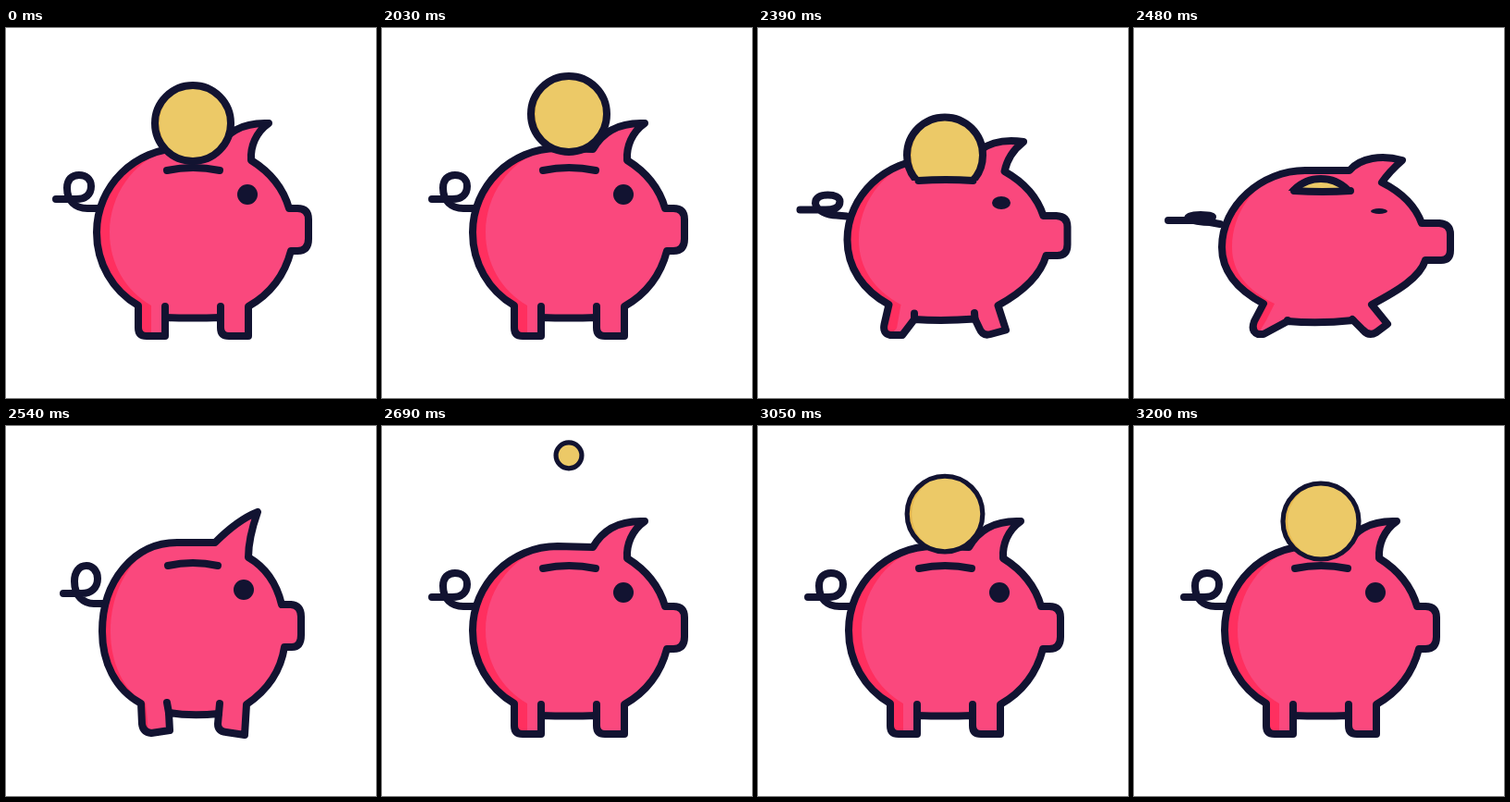
Recreate the animation shown at these times as an HTML page. Size 400x400 px, loop 3290 ms.

```html
<!DOCTYPE html>
<html lang="en">
<head>
<meta charset="utf-8">
<title>Piggy bank</title>
<style>
  html, body { margin: 0; width: 100%; height: 100%; overflow: hidden; background: #fff; }
  svg { display: block; width: 100vw; height: 100vh; }
  .line { fill: none; stroke: #121331; stroke-width: 8; stroke-linecap: round; stroke-linejoin: round; }
</style>
</head>
<body>
<svg viewBox="0 0 400 400">
  <defs>
    <clipPath id="above"><rect id="mask" width="400" height="400"/></clipPath>
    <clipPath id="disc"><circle r="41"/></clipPath>
  </defs>
  <path id="tail" class="line"/>
  <path id="fill" fill="#fa487d"/>
  <path id="shade" fill="#ff2f5f"/>
  <path id="body" class="line"/>
  <path id="stubs" class="line"/>
  <ellipse id="eye" fill="#121331"/>
  <g clip-path="url(#above)">
    <g id="coin">
      <g clip-path="url(#disc)">
        <circle r="41" fill="#e6b84f"/>
        <circle cx="5" r="41" fill="#ecc967"/>
      </g>
      <circle id="rim" class="line" r="41"/>
    </g>
  </g>
  <path id="slot" class="line"/>
</svg>
<script>
const LOOP = 3290, TICK = 30, START = 2000, END = 3200;
const $ = id => document.getElementById(id);

// Each part: rest, squashed and stretched pose with the same path structure.
const parts = {
  body: [
    'M190 130L228 131C241 108 262 102 284 103C270 113 264 128 265 143C286 156 300 174 306 195L315 195Q327 195 327 207L327 228Q327 241 315 241L308 241C301 268 285 288 262 301L262 333L241 333Q232 333 232 324L232 313Q202 314 172 313L172 333L152 333Q143 333 143 324L143 300C115 284 98 254 98 221C98 171 139 130 190 130Z',
    'M185 154L233 154C245 140 268 137 290 143C282 150 274 158 268 167C288 177 304 192 311 211L330 211Q342 212 342 223L342 240Q342 251 332 251L315 251C309 270 285 284 257 299L274 320L262 329Q254 334 247 326L237 316Q200 320 166 317L140 331L134 331Q126 328 130 317L140 298C112 283 95 264 95 237C95 192 138 154 185 154Z',
    'M185 126L226 126C240 112 254 100 272 93C266 110 262 126 262 142C281 153 293 172 298 193L308 193Q319 194 319 206L319 226Q319 239 309 239L301 239C297 265 282 286 260 301L258 334L238 331Q229 330 229 322L230 311Q200 314 176 310L177 329L157 332Q148 331 147 322L146 300C118 285 104 255 104 222C104 168 138 126 185 126Z'
  ],
  shade: [
    'M172 133C128 140 98 171 98 221C98 254 115 284 143 300L143 324Q143 333 152 333L157 333L157 300C129 284 112 254 112 221C112 180 138 145 172 133Z',
    'M160 158C120 168 95 195 95 237C95 264 112 283 140 298L130 317Q126 328 134 331L143 316L152 298C122 283 106 264 106 237C106 200 130 168 160 158Z',
    'M150 136C122 150 104 180 104 222C104 255 118 285 146 300L147 322Q148 331 157 332L154 331L151 300C126 285 113 255 113 222C113 185 128 155 150 136Z'
  ],
  tail: [
    'M54 185L76 185C86 185 92 180 92 171C92 163 86 159 79 159C71 159 66 164 66 173C66 187 75 195 88 195L99 195',
    'M37 208L70 208C80 208 85 207 85 204C85 203 80 202 72 202C64 202 58 203 58 206C60 208 75 210 82 210L93 212',
    'M62 181L82 181C92 181 99 175 99 165C99 156 93 151 87 151C79 151 74 158 74 168C74 184 84 192 95 192L106 192'
  ],
  stubs: [
    'M172 301L172 313M232 301L232 313',
    'M166 316L166 317M236 315L237 316',
    'M174 299L176 310M231 300L230 311'
  ],
  slot: [
    'M174 154Q202 148 231 154',
    'M173 176Q204 178 234 176',
    'M175 151Q202 145 229 151'
  ]
};
const eyes = ['261 180 11 11', '265 198 9 3', '257 177 11 11'];

// Pose over time: 1 squashed, -1 stretched.
const squash = [[2330, 0], [2360, .07], [2390, .5], [2420, 1.14], [2450, 1.4],
  [2480, 1], [2510, .2], [2540, -1], [2570, -.7], [2600, -.25], [2630, 0]];

function poseAt(t) {
  const i = squash.findIndex(k => k[0] > t);
  if (i < 1) return 0;
  const [a, p] = squash[i - 1], [b, q] = squash[i];
  return p + (q - p) * (t - a) / (b - a);
}

function morph(poses, p) {
  const to = poses[p < 0 ? 2 : 1].match(/\d+/g), k = Math.abs(p);
  let i = 0;
  return poses[0].replace(/\d+/g, n => (+n + (to[i++] - n) * k).toFixed(2));
}

// Height, size and rim width of the coin.
function coinAt(t) {
  if (t <= START) return { y: 103, k: 1, rim: 8 };
  if (t < 2500) return { y: 68 + 25 * ((t - 2165) / 135) ** 2, k: 1, rim: 8 };
  const u = Math.min(1, Math.max(0, (t - 2600) / 480));
  const bounce = (t - 3063) / 137;
  const y = t < 2926 ? 26 + 65 * ((t - 2600) / 300) ** 2 : 95 + 8 * bounce ** 2;
  return { y, k: 1 - (1 - u) ** 2, rim: 5.2 };
}

function draw(t) {
  const p = poseAt(t);
  for (const id in parts) $(id).setAttribute('d', morph(parts[id], p));
  $('fill').setAttribute('d', $('body').getAttribute('d'));

  const [cx, cy, rx, ry] = morph(eyes, p).split(' ');
  const eye = { cx, cy, rx, ry: Math.max(3, ry) };
  for (const key in eye) $('eye').setAttribute(key, eye[key]);

  const { y, k, rim } = coinAt(t);
  const sinking = t > 2300 && t < 2560;
  const slotY = +$('slot').getAttribute('d').match(/[\d.]+/g)[1];
  $('mask').setAttribute('height', sinking ? slotY : 400);
  $('coin').setAttribute('visibility', k > 0 && !(sinking && y - 45 > slotY) ? 'visible' : 'hidden');
  $('coin').setAttribute('transform', `translate(202 ${y}) scale(${k || 1})`);
  $('rim').style.strokeWidth = rim / (k || 1);
}

function frame() {
  const t = performance.now() % LOOP;
  const step = START + Math.floor((t - START) / TICK) * TICK;
  draw(Math.min(END, Math.max(START, step)));
  requestAnimationFrame(frame);
}
frame();
</script>
</body>
</html>
```
